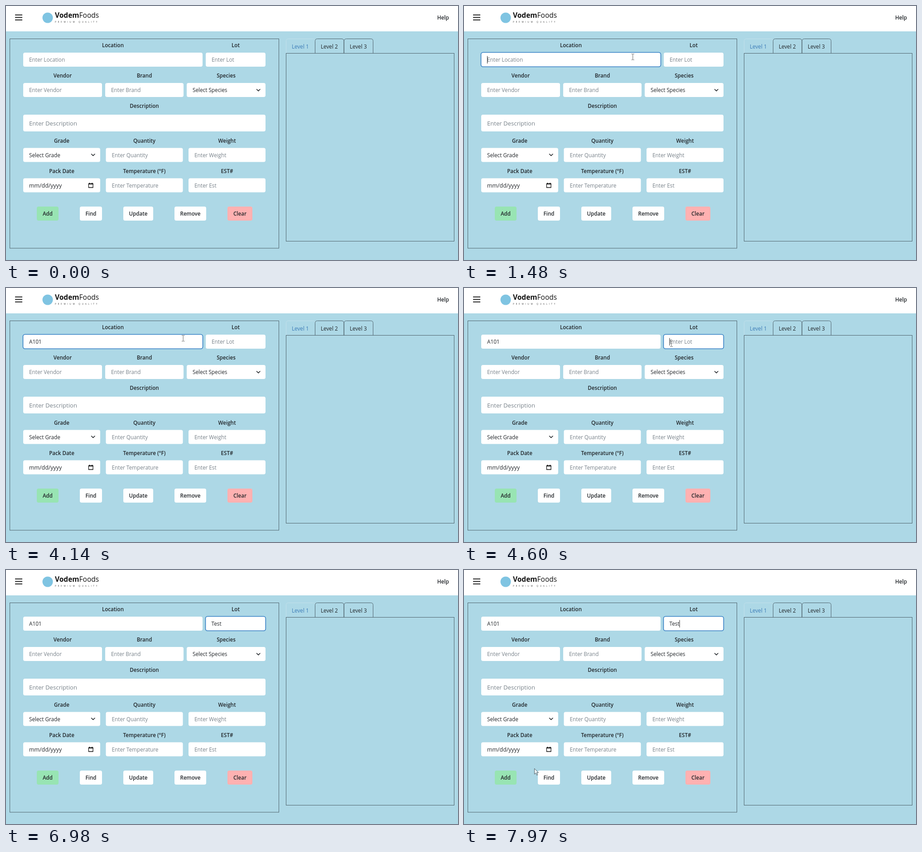
Write an HTML page that moves like this. It is 998 px wide and 561 px high and loops after 8000 ms.

```html
<!DOCTYPE html>
<html lang="en">
<head>
<meta charset="utf-8">
<title>Inventory form</title>
<style>
html, body { margin: 0; width: 100%; height: 100%; overflow: hidden; background: #add8e6; }
svg { display: block; width: 998px; height: 561px; }
text { font: 11.75px "Open Sans", "Noto Sans", sans-serif; fill: #212529; white-space: pre; }
.bold { font-weight: 600; }
.label { font-weight: 600; font-size: 11.6px; text-anchor: middle; }
.hint { fill: #78828a; }
.large { font-size: 13.1px; }
.line { fill: none; stroke: #4f636d; }
.icon { fill: none; stroke: #212529; stroke-width: 1.6; stroke-linecap: round; stroke-linejoin: round; }
.brand { font-size: 15.5px; fill: #111; }
.brand tspan { font-weight: 700; }
.tagline { font-size: 4.7px; letter-spacing: 3.7px; fill: #444; }
#focus { fill: none; stroke: #347fc4; stroke-width: 1.6; }
#caret { stroke: #222; stroke-width: 1; }
#beam { fill: none; stroke: #666; }
#arrow { fill: #e8f2f6; stroke: #47545b; stroke-width: .9; stroke-linejoin: round; }
</style>
</head>
<body>
<svg viewBox="0 0 998 561">
  <rect width="998" height="561" fill="#add8e6"/>
  <rect width="998" height="56" fill="#fff"/>
  <path d="M20 19.7h16M20 25.2h16M20 30.7h16" stroke="#222" stroke-width="1.9"/>
  <circle cx="92" cy="26" r="11.5" fill="#7fc4e2"/>
  <text class="brand" x="108" y="26"><tspan>Vodem</tspan>Foods</text>
  <text class="tagline" x="108" y="37">PREMIUM QUALITY</text>
  <text class="bold" x="952" y="30">Help</text>

  <rect class="line" x="8.5" y="72.5" width="594" height="462.5"/>
  <rect class="line" x="618.5" y="104.5" width="371" height="415"/>
  <path d="M618.5 104V77.500q0-5 5-5h54q5 0 5 5V104" fill="none" stroke="#c3e1eb"/>
  <path class="line" d="M682.500 104.500V77.500q0-5 5-5h53.500q5 0 5 5V104.500M746.500 104.500V77.500q0-5 5-5h54q5 0 5 5V104.500"/>
  <text x="631" y="94" style="fill:#3c7cb8">Level 1</text>
  <text x="695" y="94">Level 2</text>
  <text x="759" y="94">Level 3</text>

  <g id="form"></g>
  <path class="icon" d="M553.5 184l3.700 3.600 3.700-3.600M188.600 327l3.700 3.600 3.700-3.600"/>
  <path d="M182.500 392.500h9.500v8.500h-9.500z" fill="none" stroke="#111" stroke-width="1.3"/>
  <path d="M182 393h10.500M184.500 390.500v2M190 390.500v2" stroke="#111" stroke-width="1.900"/>

  <rect id="focus" y="102.5" height="31.700" rx="4.500"/>
  <text id="location" x="51" y="123"></text>
  <text id="lot" x="453.500" y="123"></text>
  <path id="caret" d="M0 110.500V127"/>
  <g id="pointer">
    <path id="beam" d="M-3-6.500h2.200l.8.800.8-.8H3M0-5.700V5.700M-3 6.500h2.200l.8-.8.8.8H3"/>
    <path id="arrow" d="M.5.500V13l3-2.700 2.300 5 2-.9-2.300-4.900h4z"/>
  </g>
</svg>
<script>
const $ = id => document.getElementById(id);
const LOOP = 8000;
const INK = '#212529';

function add(tag, attrs, content = '') {
  const node = document.createElementNS('http://www.w3.org/2000/svg', tag);
  for (const key in attrs) node.setAttribute(key, attrs[key]);
  node.textContent = content;
  $('form').append(node);
  return node;
}

const fields = [];
function field(label, hint, x, y, width, height = 31, dark = false) {
  const large = height > 31;
  add('text', { class: 'label', x: x + width / 2, y: y - (large ? 15 : 12) }, label);
  add('rect', { x, y, width, height, rx: 4, fill: '#fff' });
  const node = add('text', {
    class: (dark ? '' : 'hint') + (large ? ' large' : ''),
    x: x + 13, y: y + height / 2 + (large ? 5.200 : 4.500)
  }, hint);
  fields.push({ x, y, width, height, dark });
  return node;
}

function button(label, x, width, fill = '#fff') {
  add('rect', { x, y: 443, width, height: 31, rx: 4, fill });
  add('text', { class: 'label', x: x + width / 2, y: 462.700 }, label);
}

const locationHint = field('Location', 'Enter Location', 38, 103, 396);
const lotHint = field('Lot', 'Enter Lot', 441, 103, 132);
field('Vendor', 'Enter Vendor', 38, 170, 174);
field('Brand', 'Enter Brand', 219, 170, 173);
field('Species', 'Select Species', 399, 170, 174, 31, true);
field('Description', 'Enter Description', 38, 240, 535, 37);
field('Grade', 'Select Grade', 38, 313.5, 170, 31, true);
field('Quantity', 'Enter Quantity', 220.5, 313.5, 170);
field('Weight', 'Enter Weight', 403, 313.5, 170);
field('Pack Date', 'mm/dd/yyyy', 38, 380.5, 170, 31, true).style.fontSize = '12.4px';
field('Temperature (°F)', 'Enter Temperature', 220.5, 380.5, 170);
field('EST#', 'Enter Est', 403, 380.5, 170);
button('Add', 68, 48, '#98e4b3');
button('Find', 163, 49);
button('Update', 259, 66);
button('Remove', 372, 70);
button('Clear', 489, 55, '#ffb1b1');

const typing = {
  location: { text: 'A101', keys: [2420, 2920, 3110, 3310], hint: locationHint },
  lot: { text: 'Test', keys: [5500, 5810, 6220, 6440], hint: lotHint }
};
const clicks = { location: 1330, lot: 4480 };
const blink = 515;

// Pointer stops: time, x, y. Typing hides the pointer between runs.
const runs = [
  { end: 2920, stops: [[250, 345, 575], [550, 360, 210], [870, 360, 200], [950, 365, 124], [1190, 370, 118], [1330, 371, 116], [1840, 377, 104]] },
  { end: 5500, stops: [[4140, 391, 111], [4600, 458, 123], [4750, 459, 120]] },
  { end: LOOP, stops: [[7390, 459, 120], [7970, 155, 438]] }
];

function pointAt(stops, t) {
  const i = stops.findIndex(s => s[0] > t);
  if (i < 0) return stops.at(-1).slice(1);
  const [t0, x0, y0] = stops[i - 1], [t1, x1, y1] = stops[i];
  const k = (t - t0) / (t1 - t0);
  return [x0 + (x1 - x0) * k, y0 + (y1 - y0) * k];
}

const show = (node, on) => node.setAttribute('visibility', on ? 'visible' : 'hidden');

function drawText(t) {
  for (const id in typing) {
    const { text, keys, hint } = typing[id];
    const typed = text.slice(0, keys.filter(k => k <= t).length);
    if ($(id).textContent !== typed) $(id).textContent = typed;
    show(hint, !typed);
  }
  const active = t >= clicks.lot ? 'lot' : 'location';
  const focused = t >= clicks.location;
  show($('focus'), focused);
  $('focus').setAttribute('x', active === 'lot' ? 440.500 : 37.500);
  $('focus').setAttribute('width', active === 'lot' ? 132.800 : 397);

  const lastReset = Math.max(clicks[active], ...typing[active].keys.filter(k => k <= t));
  const caretOn = Math.floor((t - lastReset) / blink) % 2 === 0;
  show($('caret'), focused && caretOn);
  const input = $(active);
  const caretX = +input.getAttribute('x') + (input.textContent ? input.getComputedTextLength() : 0) + .5;
  $('caret').setAttribute('transform', `translate(${caretX} 0)`);
}

function drawPointer(t) {
  const run = runs.find(r => t >= r.stops[0][0] && t < r.end);
  $('pointer').style.display = run ? '' : 'none';
  if (!run) return;
  const [x, y] = pointAt(run.stops, t);
  const overText = fields.some(f => !f.dark && x >= f.x && x <= f.x + f.width && y >= f.y && y <= f.y + f.height);
  $('pointer').setAttribute('transform', `translate(${x} ${y})`);
  show($('beam'), overText);
  show($('arrow'), !overText);
}

function frame() {
  const t = performance.now() % LOOP;
  drawText(t);
  drawPointer(t);
  requestAnimationFrame(frame);
}
frame();
</script>
</body>
</html>
```
